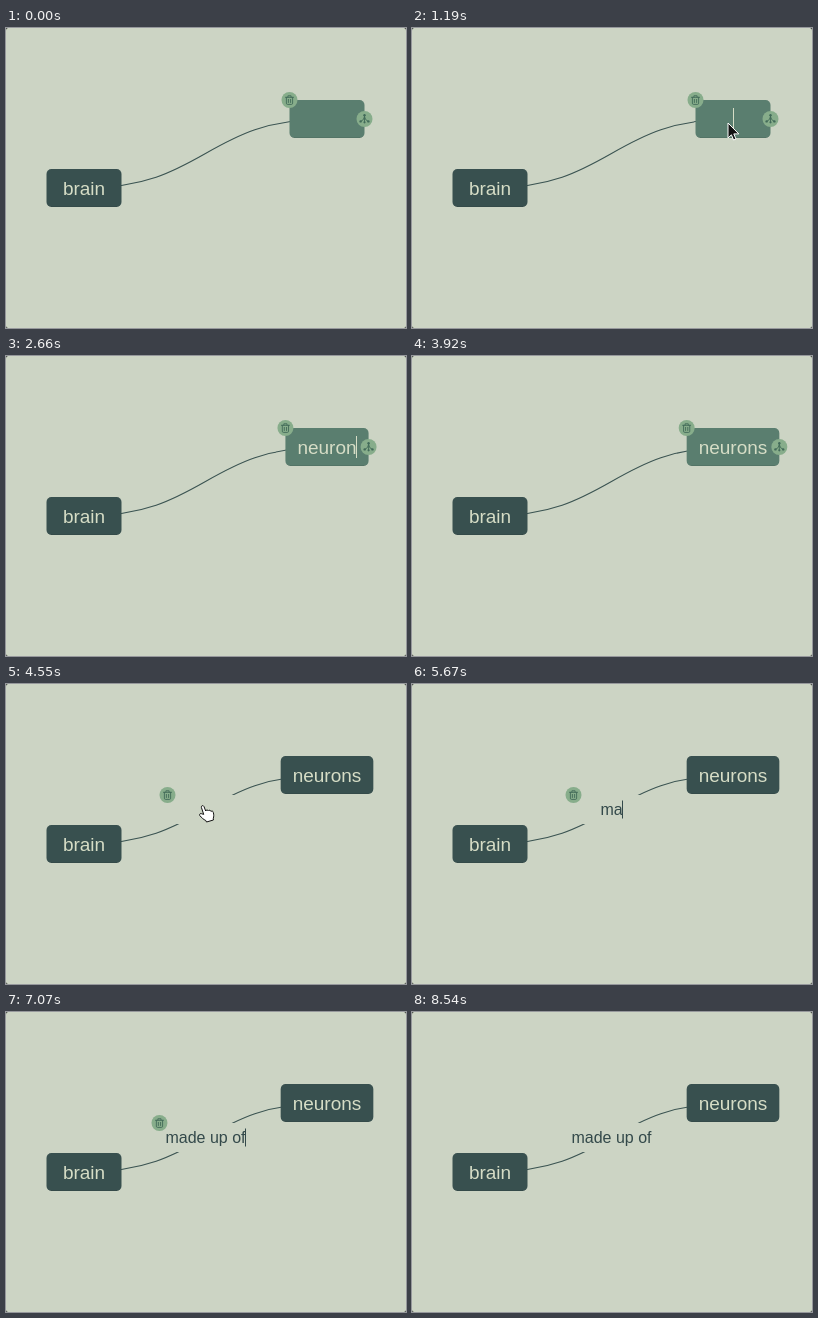
Recreate the animation shown at these times as an HTML page. Size 400x300 px, loop 9.8 s.

```html
<!DOCTYPE html>
<html lang="en">
<head>
<meta charset="utf-8">
<title>Mind map</title>
<style>
  html, body { margin: 0; width: 100%; height: 100%; overflow: hidden; background: #3a3d3a; }
  svg { display: block; width: 100vw; height: 100vh; }
  text { font-family: "Liberation Sans", Arial, sans-serif; white-space: pre; }
  .node-text { font-size: 19px; fill: #d6ddc6; }
  .label-text { font-size: 16px; fill: #33494a; }
  .dark { fill: #38504f; }
  .active { fill: #5a7e6f; }
  .paper { fill: #ccd4c4; }
  .shade { fill: none; stroke: #000; stroke-opacity: .08; }
  .edge { fill: none; stroke: #3b5452; stroke-width: 1.1; }
  .badge circle.disc { fill: #87ad8b; }
  .badge .glyph { fill: none; stroke: #426a59; stroke-width: .9; stroke-linecap: round; stroke-linejoin: round; }
  .badge .dot { fill: #426a59; stroke: none; }
  .pointer { stroke: #111; stroke-width: 1; stroke-linejoin: round; fill: #fff; }
  .arrow { stroke: #fff; fill: #111; }
</style>
</head>
<body>
<svg viewBox="0 0 400 300">
  <defs>
    <g id="trash" class="badge">
      <circle class="disc" r="8"/>
      <path class="glyph" d="M-4-2.7H4M-1.6-2.7V-4.2H1.6V-2.7M-3.1-2.7V3.2Q-3.1 4.4-2 4.4H2Q3.1 4.4 3.1 3.2V-2.7M-1.1-.6V2.5M1.1-.6V2.5"/>
    </g>
    <g id="branch" class="badge">
      <circle class="disc" r="8"/>
      <path class="glyph" d="M0-3.5V3.2M0-2.2Q-.4 1.2-3.6 2.4M0-2.2Q.4 1.2 3.6 2.4"/>
      <circle class="dot" cy="-3.8" r="1.2"/>
      <circle class="dot" cx="-3.9" cy="2.4" r="1.2"/>
      <circle class="dot" cy="3.3" r="1.1"/>
      <circle class="dot" cx="3.9" cy="2.4" r="1.2"/>
    </g>
  </defs>

  <rect class="paper" width="400" height="300" rx="2.5"/>
  <path class="edge" d="M78 160C199.5 160 199.5 91 321 91"/>

  <rect class="dark" x="40.5" y="141" width="75" height="38" rx="5"/>
  <path class="shade" d="M43 178.5H113"/>
  <text class="node-text" x="78" y="166.5" text-anchor="middle">brain</text>

  <g id="node">
    <rect id="nodeBox" y="72" height="38" rx="5"/>
    <path id="nodeShade" class="shade"/>
    <text id="nodeText" class="node-text" y="97.5"></text>
    <rect id="nodeCaret" y="80" width="1" height="22" fill="#d6ddc6"/>
    <g id="nodeTools">
      <use id="nodeTrash" href="#trash" y="72"/>
      <use id="nodeBranch" href="#branch" y="91"/>
    </g>
  </g>

  <g id="label">
    <rect id="labelBox" class="paper" y="111" height="29"/>
    <text id="labelText" class="label-text" y="131"></text>
    <rect id="labelCaret" y="116.5" width="1" height="18" fill="#33494a"/>
    <use id="labelTrash" href="#trash" y="111"/>
  </g>

  <path id="hand" class="pointer" transform="translate(193 121)"
    d="M4.7 9.4L2.4 2.4C1.9.6 4.3-.1 5 1.6L6.7 6C7 4.7 9 4.6 9.4 6 10 4.8 11.6 5 12 6.5 12.8 5.6 14 6 14.3 7.4 15 10 14.8 11.5 14.3 13.2L14.4 15 7.5 17 6.8 15.5C4.5 14.6 2.5 12.5.8 10.6-.1 9.2 1.5 8 2.8 8.8Z"/>
  <path id="arrow" class="pointer arrow" d="M0 0V15L3.4 11.8 5.6 17 8 16 5.8 10.9H10.8Z"/>
</svg>
<script>
const LOOP = 9800;
const LABEL_START = 4060, LABEL_END = 8540;
const NODE_X = 321, LABEL_X = 199.5;

const nodeTyping = [[0, ""], [1820, "n"], [2170, "ne"], [2380, "neu"], [2520, "neur"],
  [2660, "neuron"], [2800, "neurons"]];
const labelTyping = [[0, ""], [5530, "m"], [5670, "ma"], [5880, "mad"], [5950, "made"],
  [6020, "made "], [6370, "made u"], [6510, "made up"], [6650, "made up "],
  [6790, "made up o"], [7070, "made up of"]];
const nodeCaretOn = [[770, 1260], [1820, 3360], [3850, 3920]];
const labelCaretOn = [[4060, 4550], [5110, 7560], [8120, 8470]];
const handOn = [[4550, 5460]];
const arrowOn = [[1190, 1820], [7560, 7630]];

const $ = id => document.getElementById(id);
const set = (id, name, value) => $(id).setAttribute(name, value);
const show = (id, on) => set(id, "visibility", on ? "visible" : "hidden");
const within = (spans, t) => spans.some(([from, to]) => t >= from && t < to);
const latest = (steps, t) => steps.filter(([from]) => from <= t).pop()[1];

const pen = document.createElement("canvas").getContext("2d");
function textWidth(text, size) {
  pen.font = `${size}px "Liberation Sans", Arial, sans-serif`;
  return pen.measureText(text).width;
}

// Lays out a centred text box and returns its left edge and width.
function layout(name, text, size, centre, padding, minWidth) {
  const inner = textWidth(text, size);
  const width = Math.max(minWidth, inner + padding);
  const left = centre - width / 2;
  $(name + "Text").textContent = text;
  set(name + "Text", "x", centre - inner / 2);
  set(name + "Caret", "x", Math.floor(centre + inner / 2));
  set(name + "Box", "x", left);
  set(name + "Box", "width", width);
  set(name + "Trash", "x", left);
  return { left, width };
}

function draw(t) {
  const { left, width } = layout("node", latest(nodeTyping, t), 19, NODE_X, 24, 75);
  set("nodeBox", "class", t < LABEL_START ? "active" : "dark");
  set("nodeShade", "d", `M${left + 2.5} 109.5h${width - 5}`);
  set("nodeBranch", "x", left + width);
  show("nodeTools", t < LABEL_START);
  show("nodeCaret", within(nodeCaretOn, t));

  layout("label", latest(labelTyping, t), 16, LABEL_X, 12, 76);
  $("label").style.display = t < LABEL_START ? "none" : "";
  show("labelTrash", t < LABEL_END);
  show("labelCaret", within(labelCaretOn, t));

  show("hand", within(handOn, t));
  show("arrow", within(arrowOn, t));
  set("arrow", "transform", t < LABEL_START ? "translate(316 95)" : "translate(195 128)");
}

const start = performance.now();
function tick() {
  draw((performance.now() - start) % LOOP);
  requestAnimationFrame(tick);
}
tick();
</script>
</body>
</html>
```
